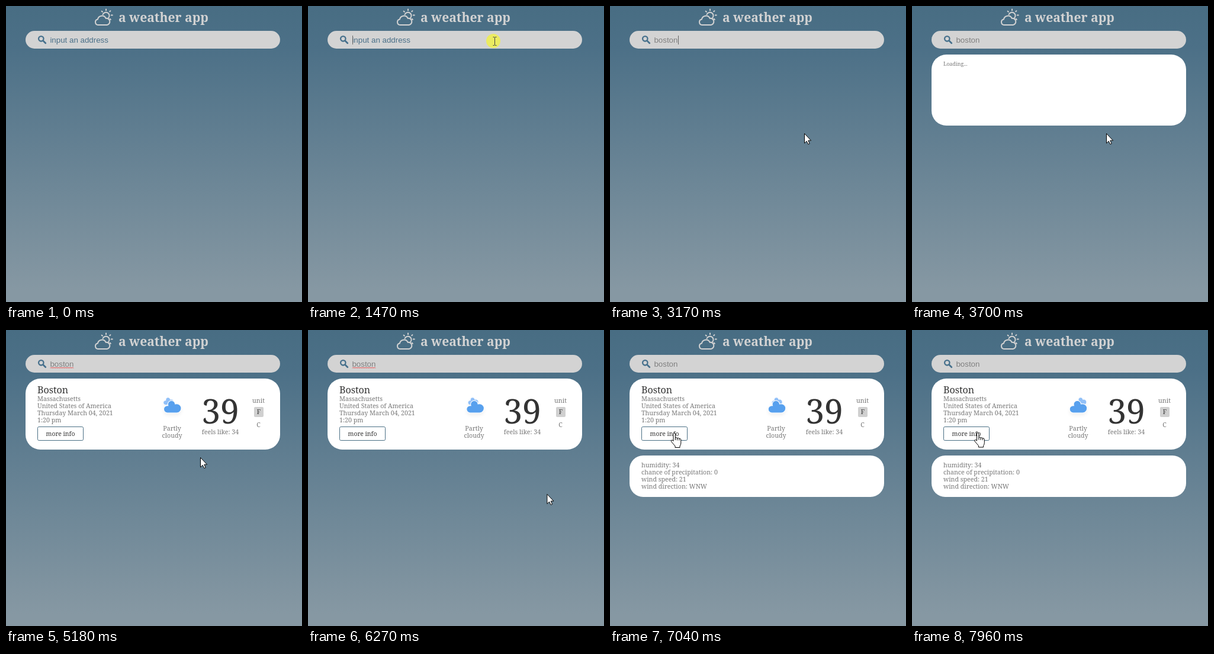
Recreate the animation shown at these times as an HTML page. Size 500 px wide and 500 px high, loop 8 s.

```html
<!DOCTYPE html>
<html lang="en">
<head>
<meta charset="utf-8">
<title>a weather app</title>
<style>
  html, body { margin: 0; width: 100%; height: 100%; overflow: hidden; }
  svg {
    display: block; width: 500px; height: 500px;
    background: linear-gradient(#486d83, #4c7087 14%, #8698a3 96%);
  }
  text { font: 10.65px "Noto Serif", serif; fill: #777; white-space: pre; }
  .title { font-size: 21.1px; font-weight: 700; fill: #d3d3d3; }
  .field { font: 13.333px "Liberation Sans", Arial, sans-serif; }
  .city { font-size: 16px; fill: #333; }
  .temp { font-size: 57px; fill: #333; }
  .loading { font-size: 8.8px; }
  .dark { fill: #333; }
  .mid { text-anchor: middle; }
  .line { fill: none; stroke: #d3d3d3; stroke-width: 2; stroke-linecap: round; stroke-linejoin: round; }
  .icon { filter: drop-shadow(0 4px 3px rgba(0, 0, 0, .05)); }
  .pointer { fill: #fff; stroke: #000; stroke-linejoin: round; }
</style>
</head>
<body>
<svg viewBox="0 0 500 500">
  <defs>
    <path id="cloud" stroke="#fff" stroke-width="1.2" d="M47.7,35.4c0-4.6-3.7-8.2-8.2-8.2c-1,0-1.9,0.2-2.8,0.5c-0.3-3.4-3.1-6.2-6.6-6.2c-3.7,0-6.7,3-6.7,6.7c0,0.8,0.2,1.6,0.4,2.3c-0.3-0.1-0.7-0.1-1-0.1c-3.7,0-6.7,3-6.7,6.7c0,3.6,2.9,6.6,6.5,6.7l17.2,0C44.2,43.3,47.7,39.8,47.7,35.4z"/>
  </defs>

  <g class="line">
    <path d="M155.5 32a4.8 4.8 0 0 1-.6-9.5a7.3 7.3 0 0 1 13.8-1.6a5.6 5.6 0 0 1 2 11.1z"/>
    <path d="M163.6 14.2A5.7 5.7 0 1 1 173 20.3"/>
    <path d="M169 5.5v2M161.7 8.7l1.2 1.2M176.4 8.2l-1.2 1.2M177.8 15.5h2M175.6 21.8l1.2 1.2"/>
  </g>
  <text class="title" x="190" y="27">a weather app</text>

  <rect x="33" y="42" width="430" height="30" rx="15" fill="#d3d3d3"/>
  <g fill="none" stroke="#46708c" stroke-linecap="round">
    <circle cx="59.3" cy="55.3" r="4.2" stroke-width="2.3"/>
    <path d="M63 59l3.8 3.8" stroke-width="2.7"/>
  </g>
  <text class="field" id="field" x="74.4" y="62"></text>
  <path id="squiggle" fill="none" stroke="#e33" stroke-width=".9"/>
  <rect id="caret" y="50" width="1" height="15" fill="#666"/>

  <rect id="card" x="33" y="82" width="430" height="120" rx="25" fill="#fff"/>
  <text class="loading" id="loading" x="53" y="101">Loading...</text>

  <g id="result">
    <text class="city" x="53" y="107">Boston</text>
    <text x="53" y="120">Massachusetts</text>
    <text x="53" y="132">United States of America</text>
    <text x="53" y="144">Thursday March 04, 2021</text>
    <text x="53" y="156">1:20 pm</text>
    <rect x="53.5" y="163.5" width="77" height="23" rx="2" fill="#fff" stroke="#4a6f84"/>
    <text class="mid dark" id="button" x="92" y="179">more info</text>
    <g id="label">
      <text class="mid" x="280.5" y="170">Partly</text>
      <text class="mid" x="280.5" y="182">cloudy</text>
    </g>
    <g class="icon" id="icon" transform="translate(251 100) scale(.9375)">
      <g id="back"><use href="#cloud" fill="#91c0f8" transform="translate(10 2) scale(.6)"/></g>
      <g id="front"><use href="#cloud" fill="#57a0ee" transform="translate(0 -1)"/></g>
    </g>
    <text class="mid temp" x="362" y="158">39</text>
    <text class="mid" x="362" y="176">feels like: 34</text>
    <text class="mid" x="426.5" y="123">unit</text>
    <rect x="419" y="130" width="16" height="17" rx="2" fill="#d0d0d0"/>
    <text class="mid dark" x="427" y="142">F</text>
    <text class="mid" x="426.5" y="164">C</text>
  </g>

  <g id="details">
    <rect x="33" y="212" width="430" height="70" rx="23" fill="#fff"/>
    <text x="53" y="232">humidity: 34</text>
    <text x="53" y="244">chance of precipitation: 0</text>
    <text x="53" y="256">wind speed: 21</text>
    <text x="53" y="268">wind direction: WNW</text>
  </g>

  <g id="cursor">
    <circle id="glow" r="12" fill="#ff0" fill-opacity=".54"/>
    <path id="beam" fill="none" stroke="#444" d="M-.5-6.5H2M3-6.5H5.5M2.5-6V7M-.5 7.5H2M3 7.5H5.5"/>
    <path id="arrow" class="pointer" d="M.5.5V16.8L4.2 13.3L6.8 18.6L9.2 17.5L6.8 12.2H11.6Z"/>
    <path id="hand" class="pointer" transform="translate(-2 -2)" d="M0 1.8Q0 0 1.7 0T3.4 1.8V8Q5 6.8 6.6 8.6Q8.4 7.6 9.8 9.4Q12 8.6 12.8 11V17Q12.8 20 11 22V24.5H3V22L-3.5 14.5Q-4.5 12-2 11.8L0 13.6ZM3.4 8v4M6.6 8.6v3.8M9.8 9.4v3.2"/>
  </g>
</svg>

<script>
const LOOP = 8000, STEP = 77;
const ICON_AT = 4940, PRESS = 6880, RELEASE = 7040;
const WORD = "boston";
const keyTimes = [2620, 2850, 2930, 3010, 3090, 3170];
const caretOn = [[1470, 2010], [2540, 3700], [4240, 4770], [5300, 5830], [6360, PRESS]];
const clicks = [[1470, 1620], [PRESS, RELEASE]];

// time, x, y of the pointer's hot spot
const path = [
  [860, 400, 111], [1010, 352, 80], [1165, 320, 62], [1240, 313, 59],
  [1550, 313, 59], [1630, 318, 96], [1705, 327, 166], [1780, 329, 206], [1855, 328, 215],
  [5870, 328, 215], [5990, 385, 255], [6110, 462, 290], [6220, 430, 286],
  [6340, 320, 248], [6480, 195, 204], [6580, 132, 183], [6720, 110, 177],
  [6880, 109, 176], [7430, 109, 176], [7580, 110, 177], [7740, 111.5, 175.5]
];

const el = {};
document.querySelectorAll("[id]").forEach(e => el[e.id] = e);
const show = (e, on) => e.style.display = on ? "" : "none";
const within = (spans, t) => spans.some(([a, b]) => t >= a && t < b);
const move = (e, x, y = 0) => e.setAttribute("transform", `translate(${x} ${y})`);

function hold(t) {
  const base = t >= ICON_AT ? ICON_AT : t >= 1470 ? 1470 : 860;
  return base + STEP * Math.floor((t - base + 6) / STEP);
}

function pointAt(t) {
  const i = path.findIndex(p => p[0] > t);
  if (i < 0) return path[path.length - 1].slice(1);
  if (i === 0) return path[0].slice(1);
  const [t0, x0, y0] = path[i - 1], [t1, x1, y1] = path[i];
  const k = (t - t0) / (t1 - t0);
  return [x0 + (x1 - x0) * k, y0 + (y1 - y0) * k];
}

// Linear there-and-back between a and b
function swing(t, period, a, b) {
  const p = (t % period) / period;
  return a + (b - a) * (1 - Math.abs(1 - 2 * p));
}

let zigzag = "M75 64.5";
for (let x = 76.5, up = true; x <= 115; x += 1.5, up = !up) zigzag += `L${x} ${up ? 63 : 64.5}`;
el.squiggle.setAttribute("d", zigzag);

function drawField(t) {
  const typed = WORD.slice(0, keyTimes.filter(k => t >= k).length);
  el.field.textContent = typed || "input an address";
  el.field.style.fill = typed ? "#808080" : "#4a6f88";
  const width = typed ? el.field.getComputedTextLength() : 0;
  el.caret.setAttribute("x", Math.ceil(74.4 + width));
  show(el.caret, within(caretOn, t));
  show(el.squiggle, t >= 4160 && t < PRESS);
}

function drawResult(t) {
  show(el.card, t >= 3700);
  show(el.loading, t >= 3700 && t < 4160);
  show(el.result, t >= 4160);
  show(el.details, t >= RELEASE);
  show(el.icon, t >= ICON_AT);
  move(el.label, 0, t >= ICON_AT ? 0 : -30);
  el.button.style.fontSize = t >= PRESS && t < RELEASE ? "9.5px" : "10.4px";
  const age = Math.max(0, hold(t) - ICON_AT + 40);
  move(el.back, swing(age, 7000, -5, 10));
  move(el.front, swing(age, 3000, 0, 2));
}

function drawCursor(t) {
  const [x, y] = pointAt(hold(t));
  const kind = y < 72 ? "beam" : t >= 6640 ? "hand" : "arrow";
  show(el.cursor, t >= 860);
  move(el.cursor, x, y);
  for (const k of ["beam", "hand", "arrow"]) show(el[k], k === kind);
  show(el.glow, within(clicks, t));
}

function render(t) {
  drawField(t);
  drawResult(t);
  drawCursor(t);
}

const start = performance.now();
function tick() {
  render((performance.now() - start) % LOOP);
  requestAnimationFrame(tick);
}
tick();
</script>
</body>
</html>
```
